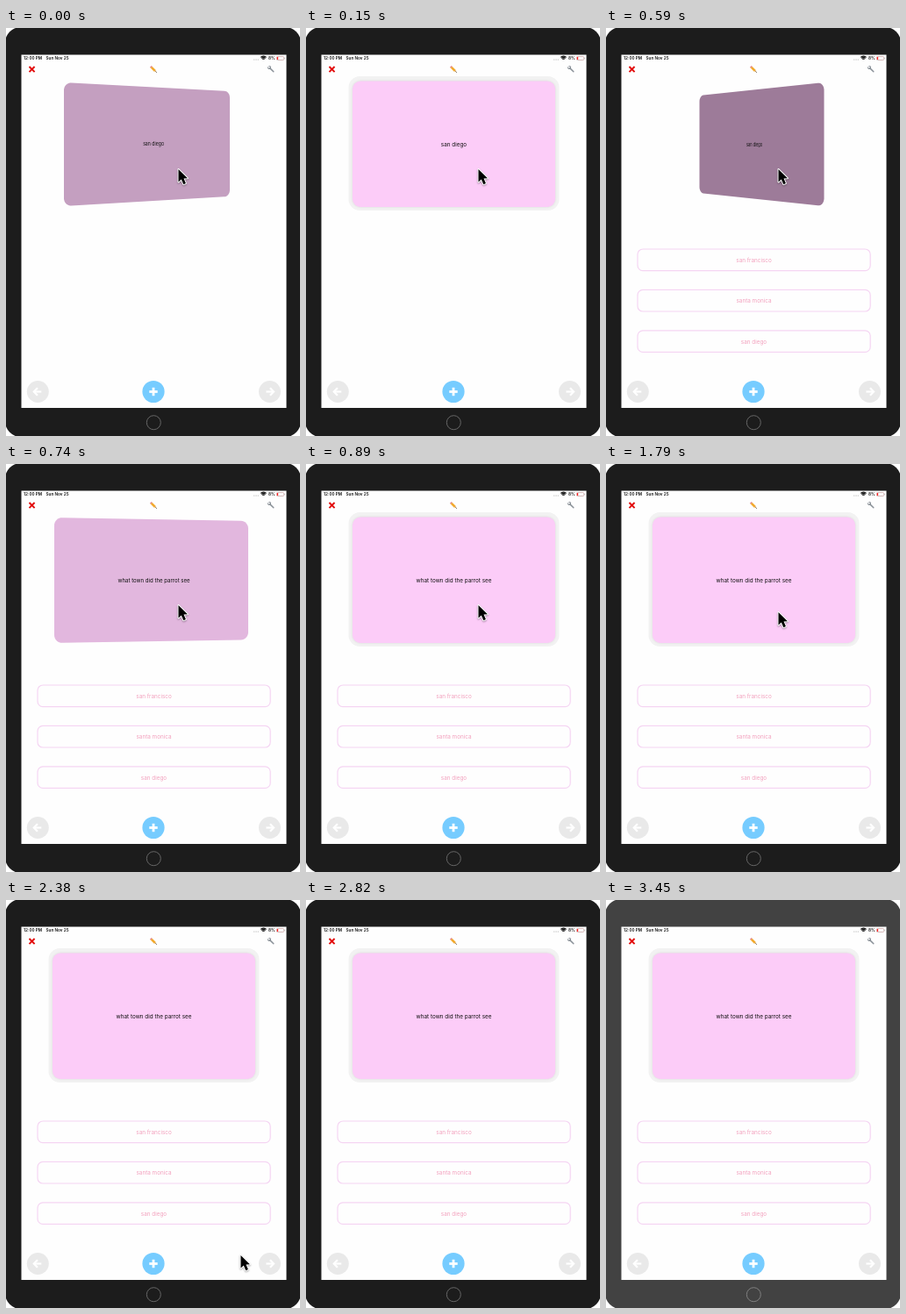
Animation, 335 px wide and 465 px high, one loop 3550 ms. Source, as an HTML page with a canvas:

```html
<!DOCTYPE html>
<html lang="en">
<head>
<meta charset="utf-8">
<title>Flash card flip</title>
<style>
  html, body { margin: 0; width: 100%; height: 100%; overflow: hidden; background: #fff; }
  canvas { display: block; width: 335px; height: 465px; }
</style>
</head>
<body>
<canvas id="stage"></canvas>
<script>
const W = 335, H = 465, LOOP = 3550;
const canvas = document.getElementById('stage');
const ctx = canvas.getContext('2d');
const dpr = window.devicePixelRatio || 1;
canvas.width = W * dpr;
canvas.height = H * dpr;

const FONT = 'Inter, Roboto, sans-serif';
const ANSWER = 'san diego';
const QUESTION = 'what town did the parrot see';
const OPTIONS = ['san francisco', 'santa monica', 'san diego'];
const CARD = { x: 53, y: 60.5, w: 231, h: 143.5, r: 9 };

// Card poses: left and right edge with their top and bottom, plus the shade.
const FLIPS = [
  { at: 0, l: [66, 62, 203], r: [255, 72, 192], fill: '#c49fc0', text: ANSWER },
  { at: 150, text: ANSWER },
  { at: 590, l: [106.5, 77, 188], r: [248.5, 62, 203], fill: '#9d7b99', text: ANSWER },
  { at: 740, l: [55, 61, 204], r: [276, 65, 200.3], fill: '#e2b7de', text: QUESTION },
  { at: 890, text: QUESTION }
];

// Pointer tip positions; it leaves through the lower right corner.
const POINTER = [
  { at: 0, x: 196.5, y: 161 },
  { at: 1790, x: 196.5, y: 169 },
  { at: 1940, x: 243.5, y: 335 },
  { at: 2090, x: 258.5, y: 372 },
  { at: 2380, x: 267.5, y: 405 },
  { at: 2530, x: 295.5, y: 448 },
  { at: 2670, x: 307.5, y: 463 },
  { at: 2820, x: W + 20, y: H + 20 }
];

const stepAt = (steps, t) => steps.filter(s => s.at <= t).pop();

function box(x, y, w, h, r, fill) {
  ctx.beginPath();
  ctx.roundRect(x, y, w, h, r);
  if (fill) {
    ctx.fillStyle = fill;
    ctx.fill();
  }
}

function disc(x, y, r, fill) {
  ctx.beginPath();
  ctx.arc(x, y, r, 0, Math.PI * 2);
  ctx.fillStyle = fill;
  ctx.fill();
}

function line(points, width, color, cap = 'butt') {
  ctx.beginPath();
  points.forEach(([x, y], i) => i ? ctx.lineTo(x, y) : ctx.moveTo(x, y));
  ctx.lineWidth = width;
  ctx.strokeStyle = color;
  ctx.lineCap = cap;
  ctx.stroke();
}

function label(text, x, y, size, color, weight = 400, align = 'center') {
  ctx.font = `${weight} ${size}px ${FONT}`;
  ctx.textAlign = align;
  ctx.fillStyle = color;
  ctx.fillText(text, x, y);
}

function drawDevice(faded) {
  ctx.fillStyle = '#fff';
  ctx.fillRect(0, 0, W, H);
  box(-1, -1, W + 2, H + 2, 18, faded ? '#424242' : '#1c1c1c');
  ctx.fillStyle = '#fefefe';
  ctx.fillRect(17.5, 30.5, 302, 402.5);
  ctx.beginPath();
  ctx.arc(168.3, 449.7, 8, 0, Math.PI * 2);
  ctx.lineWidth = 1;
  ctx.strokeStyle = faded ? '#808080' : '#666';
  ctx.stroke();
}

function drawStatus() {
  label('12:00 PM', 20, 36.4, 4.7, '#111', 600, 'left');
  label('Sun Nov 25', 45.5, 36.4, 4.7, '#111', 600, 'left');
  for (let i = 0; i < 4; i++) disc(282.4 + i * 1.7, 36, 0.5, '#aaa');
  for (const r of [1.6, 3.1, 4.6]) {
    ctx.beginPath();
    ctx.arc(293.4, 36.7, r, -Math.PI * 0.75, -Math.PI * 0.25);
    ctx.lineWidth = 1.2;
    ctx.strokeStyle = '#111';
    ctx.stroke();
  }
  label('8%', 299, 36.4, 4.7, '#111', 600, 'left');
  box(308.3, 32.6, 8.4, 3.9, 1);
  ctx.lineWidth = 0.6;
  ctx.strokeStyle = '#b98a8a';
  ctx.stroke();
  box(308.8, 33.1, 1.3, 2.9, 0.3, '#f22');
  box(317.3, 33.8, 0.6, 1.5, 0.3, '#aaa');
}

function drawTools() {
  line([[26.5, 44], [32.6, 50.2]], 1.9, '#e20a0a');
  line([[32.6, 44], [26.5, 50.2]], 1.9, '#e20a0a');

  line([[164.8, 43.8], [166, 45]], 2.6, '#e58a8a');
  line([[165.8, 44.8], [169.8, 48.8]], 2.6, '#f2a92c');
  line([[169.8, 48.8], [170.8, 49.8]], 2, '#e8c48f');
  line([[170.6, 49.6], [171.6, 50.6]], 1, '#443322');

  line([[300.6, 45.6], [304.8, 49.8]], 1.5, '#8b9299', 'round');
  ctx.beginPath();
  ctx.arc(300, 45, 1.5, -Math.PI * 0.55, Math.PI * 1.05);
  ctx.lineWidth = 1.1;
  ctx.stroke();
}

function drawArrow(x, dir) {
  const y = 414.5;
  disc(x, y, 12.5, '#e9e9e9');
  line([[x + 4.6 * dir, y], [x - 4 * dir, y]], 2.2, '#fff');
  line([[x + 0.4 * dir, y - 4.3], [x + 4.5 * dir, y], [x + 0.4 * dir, y + 4.3]], 2.2, '#fff');
}

function drawButtons() {
  drawArrow(36.3, -1);
  drawArrow(300.5, 1);
  disc(168, 414.5, 12.6, '#76ccff');
  line([[163.3, 414.5], [172.7, 414.5]], 2.8, '#fff');
  line([[168, 409.8], [168, 419.2]], 2.8, '#fff');
}

function drawOptions() {
  OPTIONS.forEach((text, i) => {
    const y = 252 + i * 46.4;
    box(36, y, 265.2, 24.6, 6);
    ctx.lineWidth = 1.2;
    ctx.strokeStyle = '#f5d5f3';
    ctx.stroke();
    label(text, 168.5, y + 14.7, 6.35, '#f2a0bd');
  });
}

// Maps a card point (u, v in 0..1) onto the turned card.
function project({ l, r }, u, v) {
  const a = (1 - u) / (l[2] - l[1]), b = u / (r[2] - r[1]), s = a + b;
  const top = (a * l[1] + b * r[1]) / s;
  const bottom = (a * l[2] + b * r[2]) / s;
  return [(a * l[0] + b * r[0]) / s, top + (bottom - top) * v];
}

function tracePose(pose) {
  const { w, h, r } = CARD;
  const corners = [[r, r], [w - r, r], [w - r, h - r], [r, h - r]];
  ctx.beginPath();
  corners.forEach(([cx, cy], i) => {
    for (let k = 0; k <= 8; k++) {
      const a = Math.PI * (1 + i / 2 + k / 16);
      ctx.lineTo(...project(pose, (cx + r * Math.cos(a)) / w, (cy + r * Math.sin(a)) / h));
    }
  });
  ctx.closePath();
}

function drawCard(pose) {
  const { x, y, w, h, r } = CARD;
  if (!pose.l) {
    box(x - 4.5, y - 5.5, w + 9, h + 9.5, 13, '#f2f2f2');
    ctx.save();
    ctx.shadowColor = 'rgba(0,0,0,.1)';
    ctx.shadowBlur = 3 * dpr;
    box(x, y, w, h, r, '#fcccf8');
    ctx.restore();
    label(pose.text, 168.5, 134.8, 6.35, '#111');
    return;
  }
  tracePose(pose);
  ctx.fillStyle = pose.fill;
  ctx.fill();
  const [cx, top] = project(pose, 0.5, 0);
  const [, bottom] = project(pose, 0.5, 1);
  ctx.save();
  ctx.translate(cx, (top + bottom) / 2);
  ctx.scale((pose.r[0] - pose.l[0]) / w, (bottom - top) / h);
  label(pose.text, 0, 2.4, 6.35, '#111');
  ctx.restore();
}

function drawPointer({ x, y }) {
  ctx.save();
  ctx.translate(x, y);
  ctx.beginPath();
  [[0, 0], [0, 14.6], [3.3, 11.6], [5.8, 17.2], [8.4, 16.1], [6, 10.6], [10.4, 10.3]]
    .forEach(p => ctx.lineTo(...p));
  ctx.closePath();
  ctx.shadowColor = 'rgba(0,0,0,.35)';
  ctx.shadowBlur = 2 * dpr;
  ctx.shadowOffsetY = dpr;
  ctx.lineWidth = 2;
  ctx.lineJoin = 'round';
  ctx.strokeStyle = '#fff';
  ctx.stroke();
  ctx.shadowColor = 'transparent';
  ctx.fillStyle = '#000';
  ctx.fill();
  ctx.restore();
}

function draw(now) {
  const t = Math.max(0, now) % LOOP;
  ctx.setTransform(dpr, 0, 0, dpr, 0, 0);
  drawDevice(t >= 3450);
  drawStatus();
  drawTools();
  drawButtons();
  if (t >= 590) drawOptions();
  drawCard(stepAt(FLIPS, t));
  drawPointer(stepAt(POINTER, t));
}

const start = performance.now();
function tick() {
  draw(performance.now() - start);
  requestAnimationFrame(tick);
}
tick();
</script>
</body>
</html>
```
